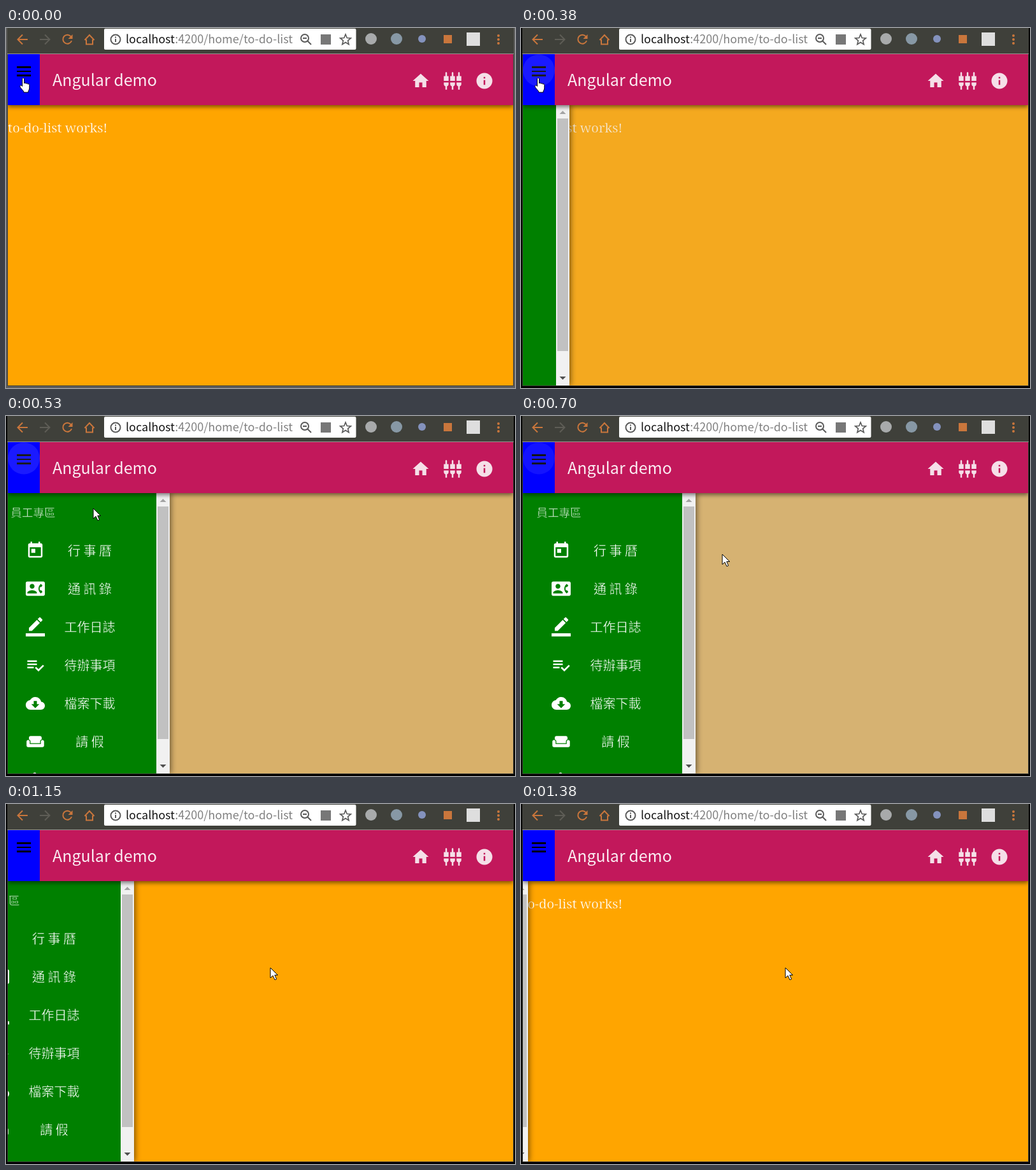
These frames come from a looping animation (799x565 px, 1.46 s). An HTML page:

```html
<!DOCTYPE html>
<html lang="zh-Hant">
<head>
<meta charset="utf-8">
<title>Angular demo</title>
<style>
html, body { margin: 0; width: 100%; height: 100%; overflow: hidden; background: #000; }
svg { display: block; }
text { font-family: "Noto Sans CJK TC", "Noto Sans CJK JP", "Noto Sans CJK SC", "Noto Sans CJK", sans-serif; fill: #fff; white-space: pre; }
/* a thin stroke in the background colour lightens the letters */
.serif { font: 300 20.25px "Noto Serif", serif; stroke: #ffa500; stroke-width: .35; }
.label { font-size: 20px; text-anchor: middle; }
#drawer text { stroke: #008000; stroke-width: .35; }
.line { fill: none; stroke-width: 2; }
.bar { filter: drop-shadow(0 3px 3px rgba(0, 0, 0, .5)); }
.panel { filter: drop-shadow(2px 0 4px rgba(0, 0, 0, .5)); }
.cursor { fill: #fff; stroke: #000; stroke-linejoin: round; }
</style>
</head>
<body>
<svg width="799" height="565" viewBox="0 0 799 565">
  <defs><clipPath id="view"><rect x="3" y="41" width="793" height="520"/></clipPath></defs>
  <rect id="desk" width="799" height="565"/>
  <rect x="2" width="795" height="562" fill="#3f403a"/>

  <!-- browser bar -->
  <g class="line" stroke="#c9763c">
    <path d="M34 18H19M26 10.5L18.5 18l7.5 7.5"/>
    <path d="M53 18H68M61 10.5L68.5 18 61 25.5" stroke="#5e5d56"/>
    <path d="M102 13.5A7 7 0 1 0 103 20"/>
    <path d="M123.5 19L131 11l7.5 8M126 18v7.5h10V18"/>
  </g>
  <path d="M104.5 10v7h-7z" fill="#c9763c"/>
  <rect x="154" y="1" width="395.5" height="33" rx="2" fill="#fff"/>
  <g class="line" stroke="#5a5a5a">
    <circle cx="172" cy="18" r="7.5"/>
    <path d="M172 17v5M172 13.5v2"/>
    <circle cx="469" cy="16" r="6"/>
    <path d="M473.5 20.5L479 26M466 16h6"/>
    <path d="M533 10l2.3 5.5 6 .5-4.6 3.9 1.4 5.8-5.1-3.1-5.1 3.1 1.4-5.8-4.6-3.9 6-.5z" stroke-width="1.7"/>
  </g>
  <text x="188" y="24" font-size="18"><tspan fill="#151515">localhost</tspan><tspan fill="#808080">:4200/home/to-do-list</tspan></text>
  <rect x="494" y="10" width="16" height="16" fill="#777"/>
  <circle cx="573" cy="17" r="9" fill="#a8aaab"/>
  <circle cx="613" cy="17" r="9" fill="#8798a5"/>
  <circle cx="653" cy="17" r="6" fill="#8492bd"/>
  <rect x="687" y="11" width="13" height="13" fill="#c9763c"/>
  <rect x="723" y="7" width="21" height="21" fill="#dedede"/>
  <g fill="#c9763c"><circle cx="773" cy="12" r="2"/><circle cx="773" cy="18" r="2"/><circle cx="773" cy="24" r="2"/></g>
  <path d="M2 40.5H797" stroke="#96968f"/>

  <!-- page -->
  <g clip-path="url(#view)">
    <rect x="3" y="121" width="793" height="440" fill="#ffa500"/>
    <text class="serif" x="3" y="164">to-do-list works!</text>
    <rect id="shade" x="3" y="121" width="793" height="440" fill="#d6b272"/>
    <g id="drawer">
      <rect class="panel" x="3" y="121" width="271" height="440" fill="#008000"/>
      <text x="24.5" y="157.5" font-size="17.5" fill-opacity=".85">員工專區</text>
      <g id="items"></g>
      <circle cx="62" cy="562" r="2.5" fill="#fff"/>
      <rect x="253" y="121" width="21" height="440" fill="#f1f1f1"/>
      <rect x="255" y="142" width="17" height="365" fill="#c1c1c1"/>
      <path d="M258.5 135h10l-5-5z" fill="#a3a3a3"/>
      <path d="M258.5 547h10l-5 5z" fill="#505050"/>
    </g>
    <rect class="bar" x="3" y="41" width="793" height="80" fill="#c2185b"/>
    <rect x="3" y="41" width="50" height="80" fill="#00f"/>
    <path d="M17 61.5H39M17 68H39M17 74.5H39" stroke="#000" stroke-width="2.5" shape-rendering="crispEdges"/>
    <text x="73" y="91" font-size="25" fill-opacity=".92">Angular demo</text>
    <g id="tools"></g>
    <circle id="ripple" cx="28" cy="66.5" fill="#fff"/>
  </g>

  <path id="hand" class="cursor" transform="translate(21.5 78)" d="M4 2c0-2 3-2 3 0v7c.5-1.5 2.8-1.2 3 .5 .6-1.3 2.6-.9 2.7 .7 1-1 2.6-.2 2.6 1.3v4.5c0 3-2 4-2 7H6.5c0-3-6-6.5-6-9.5 .2-2 2-2 3.5 0z"/>
  <path id="arrow" class="cursor" d="M0 0v16l4-3.6 3 6.6 2.6-1.2-2.8-6.3H11.5z"/>
</svg>
<script>
const $ = id => document.getElementById(id);

const icon = (x, y, d, fill) =>
  `<path transform="translate(${x} ${y}) scale(1.25)" fill="${fill}" d="${d}"/>`;

const items = [
  ["行 事 曆", "M19 3h-1V1h-2v2H8V1H6v2H5c-1.11 0-1.99.9-1.99 2L3 19c0 1.1.89 2 2 2h14c1.1 0 2-.9 2-2V5c0-1.1-.9-2-2-2zm0 16H5V8h14v11zM7 10h5v5H7z"],
  ["通 訊 錄", "M22 3H2C.9 3 0 3.9 0 5v14c0 1.1.9 2 2 2h20c1.1 0 1.99-.9 1.99-2L24 5c0-1.1-.9-2-2-2zM8 6c1.66 0 3 1.34 3 3s-1.34 3-3 3-3-1.34-3-3 1.34-3 3-3zm6 12H2v-1c0-2 4-3.1 6-3.1s6 1.1 6 3.1v1zm3.85-4h1.64L21 16l-1.99 1.99c-1.31-.98-2.28-2.38-2.73-3.99-.18-.64-.28-1.31-.28-2s.1-1.36.28-2c.45-1.62 1.42-3.01 2.73-3.99L21 8l-1.51 2h-1.64c-.22.63-.35 1.3-.35 2s.13 1.37.35 2z"],
  ["工作日誌", "M17.75 7L14 3.25l-10 10V17h3.75l10-10zm2.96-2.96c.39-.39.39-1.02 0-1.41L18.37.29c-.39-.39-1.02-.39-1.41 0L15 2.25 18.75 6l1.96-1.96zM0 20h24v4H0z"],
  ["待辦事項", "M14 10H2v2h12v-2zm0-4H2v2h12V6zM2 16h8v-2H2v2zm19.5-4.5L23 13l-6.99 7-4.51-4.5L13 14l3.01 3 5.49-5.5z"],
  ["檔案下載", "M19.35 10.04C18.67 6.59 15.64 4 12 4 9.11 4 6.6 5.64 5.35 8.04 2.34 8.36 0 10.91 0 14c0 3.31 2.69 6 6 6h13c2.76 0 5-2.24 5-5 0-2.64-2.05-4.78-4.65-4.96zM17 13l-5 5-5-5h3V9h4v4h3z"],
  ["請 假", "M21 10c-1.1 0-2 .9-2 2v3H5v-3c0-1.1-.9-2-2-2s-2 .9-2 2v5c0 1.1.9 2 2 2h18c1.1 0 2-.9 2-2v-5c0-1.1-.9-2-2-2zm-3-5H6c-1.1 0-2 .9-2 2v2.15c1.16.41 2 1.51 2 2.82V14h12v-2.03c0-1.3.84-2.4 2-2.82V7c0-1.1-.9-2-2-2z"]
];
$("items").innerHTML = items.map(([name, d], i) =>
  icon(48, 196 + 60 * i, d, "#fff") + `<text class="label" x="148.5" y="${219 + 60 * i}">${name}</text>`
).join("");

const plug = x => `M${x + 4} 2c0-.55-.45-1-1-1s-1 .45-1 1v4H${x}v6h6V6h-2zM${x} 16c0 1.3.84 2.4 2 2.82V23h2v-4.18c1.16-.41 2-1.51 2-2.82v-2h-6z`;
const pale = "#f5dfe8";
$("tools").innerHTML =
  icon(636, 68, "M10 20v-6h4v6h5v-8h3L12 3 2 12h3v8z", pale) +
  icon(686, 68, [1, 9, 17].map(plug).join(""), pale) +
  icon(736, 68, "M12 2C6.48 2 2 6.48 2 12s4.48 10 10 10 10-4.48 10-10S17.52 2 12 2zm1 15h-2v-6h2v6zm0-8h-2V7h2v2z", pale);

// cubic-bezier(.25, .8, .25, 1)
function ease(x) {
  if (x <= 0) return 0;
  if (x >= 1) return 1;
  let lo = 0, hi = 1, s;
  for (let i = 0; i < 25; i++) {
    s = (lo + hi) / 2;
    if (.75 * s * (1 - s) + s ** 3 < x) lo = s; else hi = s;
  }
  return 2.4 * s * (1 - s) ** 2 + 3 * s * s * (1 - s) + s ** 3;
}

const ticks = [0, 300, 380, 460, 530, 620, 690, 760, 840, 1150, 1240, 1310, 1380];
const mouse = [[460, 66, 105], [530, 137, 145], [620, 236, 184], [690, 316, 217], [760, 380, 243], [840, 415, 257]];

function draw(t) {
  const closing = t >= 1150;
  const open = closing ? 1 - ease((t - 1114.5) / 428) : ease((t - 350.6) / 354);
  $("desk").setAttribute("fill", t < 300 ? "#5c5c5c" : "#000");
  $("drawer").setAttribute("transform", `translate(${Math.round(271 * (open - 1))} 0)`);
  $("drawer").setAttribute("visibility", open > 0 ? "visible" : "hidden");
  $("shade").setAttribute("opacity", closing ? 0 : open);

  const fade = Math.min(1, Math.max(0, (880 - t) / 260));
  $("ripple").setAttribute("r", t < 300 ? 0 : t < 380 ? 17 : 25);
  $("ripple").setAttribute("opacity", closing ? 0 : (t < 380 ? .08 : .1) * fade);

  const spot = mouse.filter(m => m[0] <= t).pop();
  $("hand").setAttribute("visibility", spot ? "hidden" : "visible");
  $("arrow").setAttribute("visibility", spot ? "visible" : "hidden");
  if (spot) $("arrow").setAttribute("transform", `translate(${spot[1]} ${spot[2]})`);
}

const start = performance.now();
function loop() {
  const t = Math.max(0, performance.now() - start) % 1460;
  draw(ticks.filter(k => k <= t).pop());
  requestAnimationFrame(loop);
}
loop();
</script>
</body>
</html>
```
